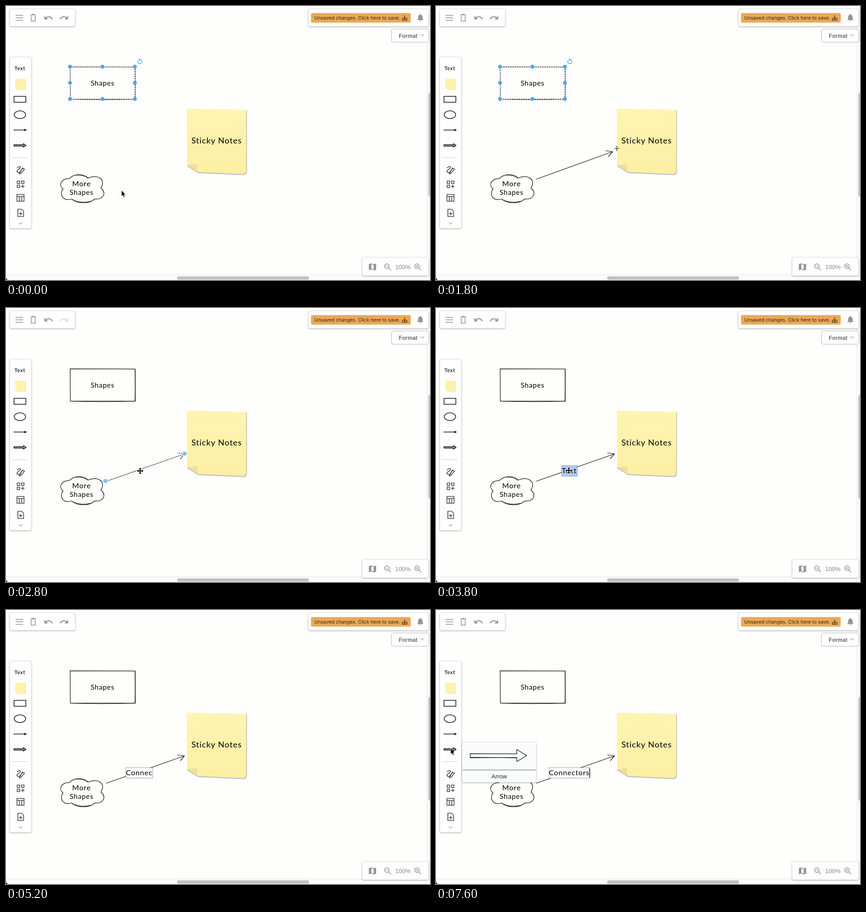
Write an HTML page that moves like this. It is 929 by 602 pixels and loops after 8 s.

```html
<!DOCTYPE html>
<html lang="en">
<head>
<meta charset="utf-8">
<title>Whiteboard connectors</title>
<style>
  html, body { margin: 0; width: 100%; height: 100%; overflow: hidden; background: #fefefd; }
  svg { display: block; width: 929px; height: 602px; }
  .panel { fill: #fff; stroke: #e3e3e3; filter: drop-shadow(0 1px 1.5px rgba(0,0,0,.3)); }
  .ink { fill: none; stroke: #111; stroke-width: 1.25; stroke-linejoin: round; stroke-linecap: round; }
  .thin { stroke-width: .9; }
  .bold { stroke-width: 1.5; }
  .icon { fill: none; stroke: #8f8f8f; stroke-width: 1.5; }
  .tool { fill: none; stroke: #444; stroke-width: 1.6; }
  .solid { fill: #959595; }
  .hand { font: 400 16px Lato, sans-serif; letter-spacing: .05em; fill: #000; text-anchor: middle; }
  .small { font-size: 15.3px; }
  .large { font-size: 18.2px; }
  .ui { font-family: "Liberation Sans", Arial, sans-serif; }
  .knob { fill: #4ba9ea; }
  .dash { fill: none; stroke: #fff; stroke-width: 1.5; stroke-dasharray: 2 3; }
  .dots { stroke: #444; stroke-width: 1; stroke-dasharray: 1 1; }
</style>
</head>
<body>
<svg viewBox="0 0 929 602">
  <defs>
    <linearGradient id="paper" x2="0" y2="1">
      <stop stop-color="#fef4b3"/><stop offset="1" stop-color="#fcefa4"/>
    </linearGradient>
    <path id="undo" d="M12.5 8c-2.65 0-5.05 1-6.9 2.6L2 7v9h9l-3.6-3.6c1.4-1.2 3.1-1.9 5.1-1.9 3.5 0 6.5 2.3 7.6 5.5l2.4-.8C21 11 17.1 8 12.5 8z"/>
  </defs>
  <rect width="929" height="602" fill="#fefefd"/>

  <!-- scrollbars -->
  <path d="M922.5 0V590.5M0 590.5H929" stroke="#e6e6e6"/>
  <rect x="923" width="6" height="590" fill="#fafafa"/>
  <rect y="591" width="929" height="11" fill="#fafafa"/>
  <rect x="925.5" y="191" width="7" height="228" rx="3.5" fill="#c1c1c1"/>
  <rect x="375" y="594" width="289" height="7" rx="3.5" fill="#c1c1c1"/>
  <path d="M0 596Q1 601 5 602H0z" fill="#333"/>

  <!-- drawing -->
  <g class="ink">
    <path d="M140.500 133.500L283 134L283.300 204.800L141 204.500z"/>
    <path class="thin" d="M141 204.500Q211 207.500 282 204.500M282.500 134Q284 165 282.500 204"/>
  </g>
  <text class="hand small" x="211.500" y="174.500">Shapes</text>
  <g id="selection">
    <path d="M140.500 133.500H283V204.500H140.500z" class="dash"/>
    <g id="knobs" class="knob"></g>
    <path d="M295.500 118.500A4.500 4.500 0 1 1 289.500 119.500" fill="none" stroke="#4ba9ea" stroke-width="1.500"/>
    <path d="M291 115.500l5 1.500-4 4z" class="knob"/>
  </g>

  <path d="M398 228L528 229V366L523 371.500L421 367L397 352z" fill="#b9b9bb"/>
  <path d="M396 225.500L526.500 228V365L521.500 369.500L421 365L397 350z" fill="url(#paper)"/>
  <path d="M397 350L419 347L419 361L421 365z" fill="#ece09a"/>
  <text class="hand large" x="461.500" y="302">Sticky Notes</text>

  <path class="ink" d="M139 379C149 368 170 368 180 378C200 369 220 380 208 400C221 410 214 426 194 424C184 435 156 435 144 424C124 430 116 413 125 402C114 393 121 379 139 379z"/>
  <path class="ink thin" d="M154 372Q168 370 179 378M146 426Q165 434 185 429"/>
  <text class="hand" x="165.500" y="396">More</text>
  <text class="hand small" x="165.500" y="415">Shapes</text>

  <g id="connector">
    <path id="line" class="ink"/>
    <g id="ends">
      <path class="dash" d="M218 380.500L391 320M376 319L391 320L381 331"/>
      <circle cx="304" cy="349" r="2.500" fill="#bfe3fa"/>
      <g fill="#4ba9ea" stroke="#fff">
        <circle cx="218" cy="380" r="5"/><circle cx="391.500" cy="320" r="5"/>
        <circle cx="218" cy="380" r="2.800"/><circle cx="391.500" cy="320" r="2.800"/>
      </g>
    </g>
  </g>
  <g id="label">
    <rect id="labelBox" class="dots" y="346.500" height="23"/>
    <path id="hint" d="M279 368H308" stroke="#ccc" stroke-dasharray="3 2"/>
    <text id="labelText" class="hand" x="291.800" y="363"></text>
    <path id="caret" stroke="#111" stroke-width="1.200"/>
  </g>

  <!-- top left -->
  <rect class="panel" x="8.500" y="6.500" width="143" height="38" rx="3"/>
  <path class="icon" d="M21 20.500H37.500M21 26H37.500M21 31.500H37.500"/>
  <path class="icon" d="M55.300 21V33.300H64V21M53.500 19.500H65.800M57 18.300H62.500"/>
  <use href="#undo" class="solid" transform="translate(82.200 15.200) scale(.9)"/>
  <use id="redo" href="#undo" class="solid" transform="translate(138 15.200) scale(-.9 .9)"/>

  <!-- top right -->
  <rect class="panel" x="662.500" y="6.500" width="263" height="38" rx="3"/>
  <rect x="668.300" y="15.500" width="218.500" height="21" rx="3" fill="#eaa956"/>
  <text x="675.500" y="30" style="font:10.600px Inter,sans-serif" fill="#2f2819">Unsaved changes. Click here to save.</text>
  <path d="M868.500 26V31H878.500V26M873.500 20.500V28M870.500 25.500L873.500 28.500L876.500 25.500" fill="none" stroke="#3a2f1c" stroke-width="1.300"/>
  <path class="solid" transform="translate(898 15.500) scale(.82)" d="M12 22c1.100 0 2-.9 2-2h-4c0 1.100.9 2 2 2zm6-6v-5c0-3.100-1.600-5.600-4.500-6.300V4c0-.8-.7-1.500-1.500-1.500s-1.500.7-1.500 1.500v.7C7.600 5.400 6 7.900 6 11v5l-2 2v1h16v-1l-2-2z"/>
  <rect x="844.500" y="50.500" width="82" height="29" rx="4" fill="#fff" stroke="#b4b4b4"/>
  <text class="ui" x="860.500" y="69.500" font-size="12.100" font-weight="700" fill="#6b6b6b">Format</text>
  <path d="M908 62L912 66L916 62" fill="none" stroke="#aaa" stroke-width="1.300"/>

  <!-- sidebar -->
  <rect class="panel" x="8.500" y="112.500" width="47" height="376" rx="3"/>
  <text class="hand" x="30.300" y="141" style="font-size:11.500px;font-weight:500">Text</text>
  <path d="M20 159.500L42 160V183.500L24 183L20 180.500z" fill="#fef2ab"/>
  <path d="M42.300 161V184H25" fill="none" stroke="#ddd6a0" stroke-width=".8"/>
  <g class="ink bold">
    <rect x="17.500" y="198.500" width="26" height="13"/>
    <ellipse cx="30.500" cy="238.800" rx="12.500" ry="8.500"/>
    <path d="M17 272.500H43"/>
    <path class="thin" d="M41 270.500L45 272.500L41 274.500z" fill="#111"/>
    <path d="M17.500 304.800H38V302.500L44 306.300L38 310V307.800H17.500z" fill="#bbb"/>
  </g>
  <path d="M14 333H47" stroke="#ccc"/>
  <g class="tool">
    <path d="M24 356C31 350 35 354 29 358S22 364 27 366S32 363 36 356L40.500 358.500L33 367.500L29.500 369V365.500L37.500 356"/>
    <path d="M24.500 384.500h5.500v5.500h-5.500zM34 384.500h5.500v5.500H34zM24.500 393.500h5.500v5.500h-5.500zM36.800 392.500V400M33 396.300H40.500"/>
    <path d="M24 414h15.500v15H24zM24 418.500H39.500M29 418.500V429M34.500 418.500V429"/>
    <path d="M26 446.500H34L38.500 451V462.500H26zM32.300 452.500V460M28.500 456.300H36"/>
  </g>
  <path d="M28 475.500L32 479.500L36 475.500" fill="none" stroke="#aaa" stroke-width="1.300"/>

  <!-- zoom -->
  <rect class="panel" x="780.500" y="552.500" width="145" height="40" rx="3"/>
  <path d="M795 567L800.500 565.500L805.500 567.500L811 566V579.500L805.500 581L800.500 579L795 580.500z" class="solid"/>
  <path d="M800.500 567.500L805.500 569V579L800.500 577.500z" fill="#fff"/>
  <g id="lenses" class="icon"></g>
  <text class="ui" x="853" y="578" font-size="13" fill="#858585">100%</text>

  <g id="popup">
    <rect class="panel" x="57.500" y="290.500" width="162" height="88" rx="3" style="fill:#fafbfb"/>
    <path class="ink" d="M75 315.500L177 316V306.500L199 320L177 333V324L75 324.500z"/>
    <path class="ink thin" d="M76 323.500L176 325"/>
    <path d="M58 351.500H219" stroke="#92929a" stroke-width="1.300"/>
    <text class="ui" x="138.500" y="370" font-size="13" fill="#222" text-anchor="middle">Arrow</text>
  </g>

  <g id="pointer">
    <path id="arrow" d="M0 0V13L3 10.300L5 15L7.500 14L5.500 9.500H9.300z" fill="#000" stroke="#fff" stroke-width=".8"/>
    <path id="cross" d="M-6 0H6M0-6V6" stroke="#222" stroke-width="1.200"/>
    <path id="move" d="M0-7L3-4H1V-1H4V-3L7 0L4 3V1H1V4H3L0 7L-3 4H-1V1H-4V3L-7 0L-4-3V-1H-1V-4H-3z" fill="#000" stroke="#fff" stroke-width="1.600" stroke-linejoin="round" paint-order="stroke"/>
  </g>
</svg>
<script>
const STEP = 200, LOOP = 8000;
const $ = id => document.getElementById(id);
const show = (id, on) => { $(id).style.display = on ? '' : 'none'; };

// step, cursor kind, x, y
const moves = [
  [0, 'arrow', 253, 405], [1, 'arrow', 230, 390], [4, 'arrow', 45, 278], [6, 'arrow', 31, 268],
  [7, 'arrow', 140, 352], [8, 'cross', 290, 351], [9, 'cross', 396, 313], [10, 'cross', 402, 312],
  [13, 'move', 350, 336], [14, 'move', 294, 358], [16, 'move', 291, 357], [20, '', 291, 357],
  [31, 'arrow', 291, 352], [33, 'arrow', 155, 271], [35, 'arrow', 48, 298], [36, 'arrow', 32, 304],
];
// step, label text
const typing = [
  [17, 'Text'], [20, 'C'], [21, 'Con'], [22, 'Conne'], [23, 'Connec'], [24, 'Connecotr'],
  [25, 'Connecot'], [26, 'Connec'], [27, 'Connect'], [28, 'Connector'], [29, 'Connectors'],
];
const latest = (rows, k) => rows.filter(r => r[0] <= k).pop();

function pointerAt(k) {
  const a = latest(moves, k), b = moves[moves.indexOf(a) + 1] || a;
  const p = b === a ? 0 : (k - a[0]) / (b[0] - a[0]);
  return { kind: a[1], x: a[2] + (b[2] - a[2]) * p, y: a[3] + (b[3] - a[3]) * p };
}

for (const x of [140, 211, 282])
  for (const y of [133, 168.5, 204])
    if (x !== 211 || y !== 168.5) $('knobs').innerHTML += `<circle cx="${x + 0.3}" cy="${y + 0.2}" r="4.3"/>`;

for (const [x, plus] of [[834.5, ''], [900.5, 'M0-2.5V2.5']])
  $('lenses').innerHTML += `<g transform="translate(${x} 571.5)"><circle r="5"/><path d="M3.5 3.5L9 9"/><path d="M-2.5 0H2.5${plus}" stroke-width="1.2"/></g>`;

function drawLabel(text, selected, caretOn) {
  $('labelText').textContent = text;
  const width = Math.round($('labelText').getComputedTextLength() + 1);
  const left = Math.round(291.5 - width / 2) + 0.5;
  $('labelBox').setAttribute('x', left);
  $('labelBox').setAttribute('width', width);
  $('labelBox').setAttribute('fill', selected ? '#abcef8' : '#fff');
  $('caret').setAttribute('d', `M${left + width - 1} 348V368`);
  show('caret', caretOn && !selected);
  show('hint', !selected && text.length > 4);
}

function render(t) {
  const k = Math.floor(t / STEP);
  const p = pointerAt(k);
  for (const kind of ['arrow', 'cross', 'move']) show(kind, p.kind === kind);
  $('pointer').setAttribute('transform', `translate(${p.x} ${p.y})`);

  show('selection', k < 13);
  $('redo').style.opacity = k >= 13 && k < 17 ? 0.35 : 1;

  const [x, y] = k < 10 ? [p.x - 9, p.y + 7] : [391, 320.5];
  $('line').setAttribute('d', `M220 380.5L${x} ${y}m-15-2l15 2l-9 10.5`);
  show('connector', k >= 8);
  show('ends', k >= 13 && k < 17);

  const label = latest(typing, k);
  show('label', label);
  if (label) drawLabel(label[1], k < 20, Math.floor(t / 500) % 2 === 1);
  show('popup', k >= 37);
}

const start = performance.now();
function tick() {
  render((performance.now() - start) % LOOP);
  requestAnimationFrame(tick);
}
tick();
</script>
</body>
</html>
```
